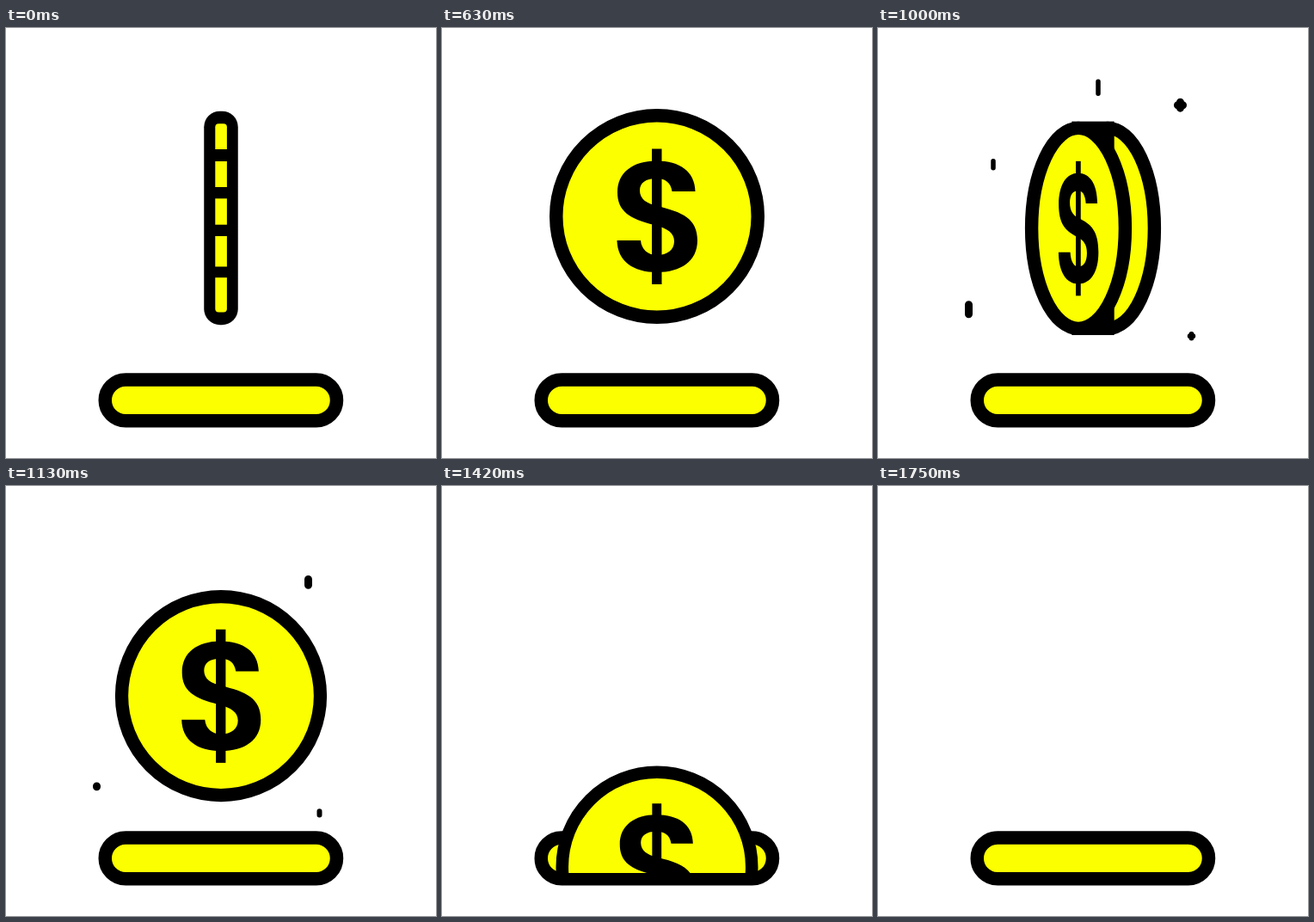
Animation, 500 px wide and 500 px high, one loop 2000 ms. Source, as an HTML page:

```html
<!DOCTYPE html>
<html lang="en">
<head>
<meta charset="utf-8">
<title>Coin drop</title>
<style>
  html, body { margin: 0; width: 100%; height: 100%; overflow: hidden; background: #fff; }
  svg { display: block; width: 100vw; height: 100vh; }
</style>
</head>
<body>
<svg viewBox="0 0 500 500">
  <defs><clipPath id="slot"><rect width="500" height="450"/></clipPath></defs>
  <rect x="115.25" y="409" width="269.25" height="47.75" rx="23.9" fill="#fbff00" stroke="#000" stroke-width="15.5"/>
  <g id="sparks" fill="none" stroke="#000" stroke-linecap="round"></g>
  <g clip-path="url(#slot)"><g id="coin"></g></g>
</svg>
<script>
const LOOP = 2000, FPS = 24;
const YELLOW = '#fbff00';
const CENTER = { x: 250, y: 221 };
const RADIUS = 125, LINE = 15.5, THICKNESS = 39.5;
const sparkLayer = document.getElementById('sparks');
const coin = document.getElementById('coin');

// Sparks fall at one speed; x and y are where each one is at SPARK_REF.
const SPARK_REF = 21, SPARK_SPEED = 7.4;
const SPARKS = [
  { x: 256, y: 47, born: 19, life: 7.9, w: 5.5, armX: 3.3, armY: 7.6 },
  { x: 351.5, y: 67.5, born: 21, life: 9, w: 9, armX: 3.5, armY: 4 },
  { x: 134, y: 136.5, born: 18, life: 8, w: 5.5, armX: 3.4, armY: 5.7 },
  { x: 105.5, y: 305, born: 18, life: 9.2, w: 9, armX: 4, armY: 6.2 },
  { x: 364.5, y: 336, born: 21, life: 9, w: 6, armX: 2, armY: 2.5 }
];

// Fall of the coin: [step, offset, speed].
const FALL = [[27, 23, 5], [34, 222, 33], [40, 327, 7], [42, 338, 4]];

// Spin: [first step, angle]; 0 is edge-on, 90 is face-on.
const SPIN = [[0, 0], [3, 30], [6, 60], [8, 90], [16, 120], [18, 150],
              [20, 180], [23, 210], [25, 240], [27, 270]];

const DOLLAR = `
  <path d="M267.5 192C266 181 259 177 249 177C237 177 230 182 230 191
    C230 201 238 206 250 209C280 216 297 224 297 249C297 273 278 286 250 286
    C222 286 204 273 203.5 249H231C232 260 240 266 250 266C262 266 270 260 270 250
    C270 240 262 235 247 231C218 224 204 215 204 193C204 170 222 156.5 249 156.5
    C277 156.5 294 169 294.5 192Z"/>
  <rect x="244" y="142.5" width="11.5" height="157.5"/>`;

function hermite([k0, p0, v0], [k1, p1, v1], k) {
  const d = k1 - k0, u = (k - k0) / d, u2 = u * u, u3 = u2 * u;
  return (2 * u3 - 3 * u2 + 1) * p0 + (u3 - 2 * u2 + u) * d * v0 +
         (3 * u2 - 2 * u3) * p1 + (u3 - u2) * d * v1;
}

function coinOffset(k) {
  const t = Math.max(0, k - 14);
  if (k <= FALL[0][0]) return -2.485 * t + 0.498 * t * t - 0.0131 * t ** 3;
  const i = FALL.findIndex(key => k <= key[0]);
  return hermite(FALL[i - 1], FALL[i], k);
}

const coinScale = k => 1 - 8.75e-6 * Math.max(0, k - 15) ** 3;

function edgeView() {
  const ridges = [[141, 14], [185, 13.3], [228.7, 13.3], [277.5, 12.7]]
    .map(([y, h]) => `<rect x="240" y="${y}" width="20" height="${h}"/>`).join('');
  return `<rect x="230.25" y="96.7" width="${THICKNESS}" height="248.5" rx="18.5"/>
    <rect x="243.3" y="111.2" width="13.6" height="219.3" rx="4" fill="${YELLOW}"/>${ridges}`;
}

function faceView(angle) {
  const a = angle * Math.PI / 180;
  const wide = Math.abs(Math.sin(a));
  const shift = Math.cos(a) * THICKNESS / 2;
  const { x, y } = CENTER;
  const rx = RADIUS * wide - LINE / 2, ry = RADIUS - LINE / 2;
  const disc = dx => `<ellipse cx="${x + dx}" cy="${y}" rx="${rx}" ry="${ry}"/>`;
  const half = Math.abs(shift);
  const rim = half < 0.01 ? '' : disc(-shift) +
    `<rect x="${x - half}" y="${y - ry}" width="${2 * half}" height="${2 * ry}"/>`;
  return `<g fill="${YELLOW}" stroke="#000" stroke-width="${LINE}">${rim}${disc(shift)}</g>
    <g transform="translate(${x + shift} 0) scale(${wide} 1) translate(${-x} 0)">${DOLLAR}</g>`;
}

function drawCoin(k) {
  if (k >= 42) return '';
  const angle = SPIN.filter(([start]) => start <= k).pop()[1];
  const { x, y } = CENTER;
  const place = `translate(${x} ${y + coinOffset(k)}) scale(${coinScale(k)}) translate(${-x} ${-y})`;
  return `<g transform="${place}">${angle % 180 ? faceView(angle) : edgeView()}</g>`;
}

function drawSpark(s, k) {
  const u = (k - s.born) / s.life;
  if (u < 0 || u >= 1) return '';
  const y = s.y + (k - SPARK_REF) * SPARK_SPEED;
  const v = s.armY * Math.sin(Math.PI * u) + 0.01;
  const h = s.armX * Math.max(0, Math.sin(2 * Math.PI * u)) + 0.01;
  return `<path stroke-width="${s.w}" d="M${s.x} ${y - v}v${2 * v}M${s.x - h} ${y}h${2 * h}"/>`;
}

let shown = -1;
function render(ms) {
  const k = Math.floor(((ms + 4) % LOOP) * FPS / 1000);
  if (k === shown) return;
  shown = k;
  sparkLayer.innerHTML = SPARKS.map(s => drawSpark(s, k)).join('');
  coin.innerHTML = drawCoin(k);
}

const start = performance.now();
function tick() {
  render(performance.now() - start);
  requestAnimationFrame(tick);
}
tick();
</script>
</body>
</html>
```
